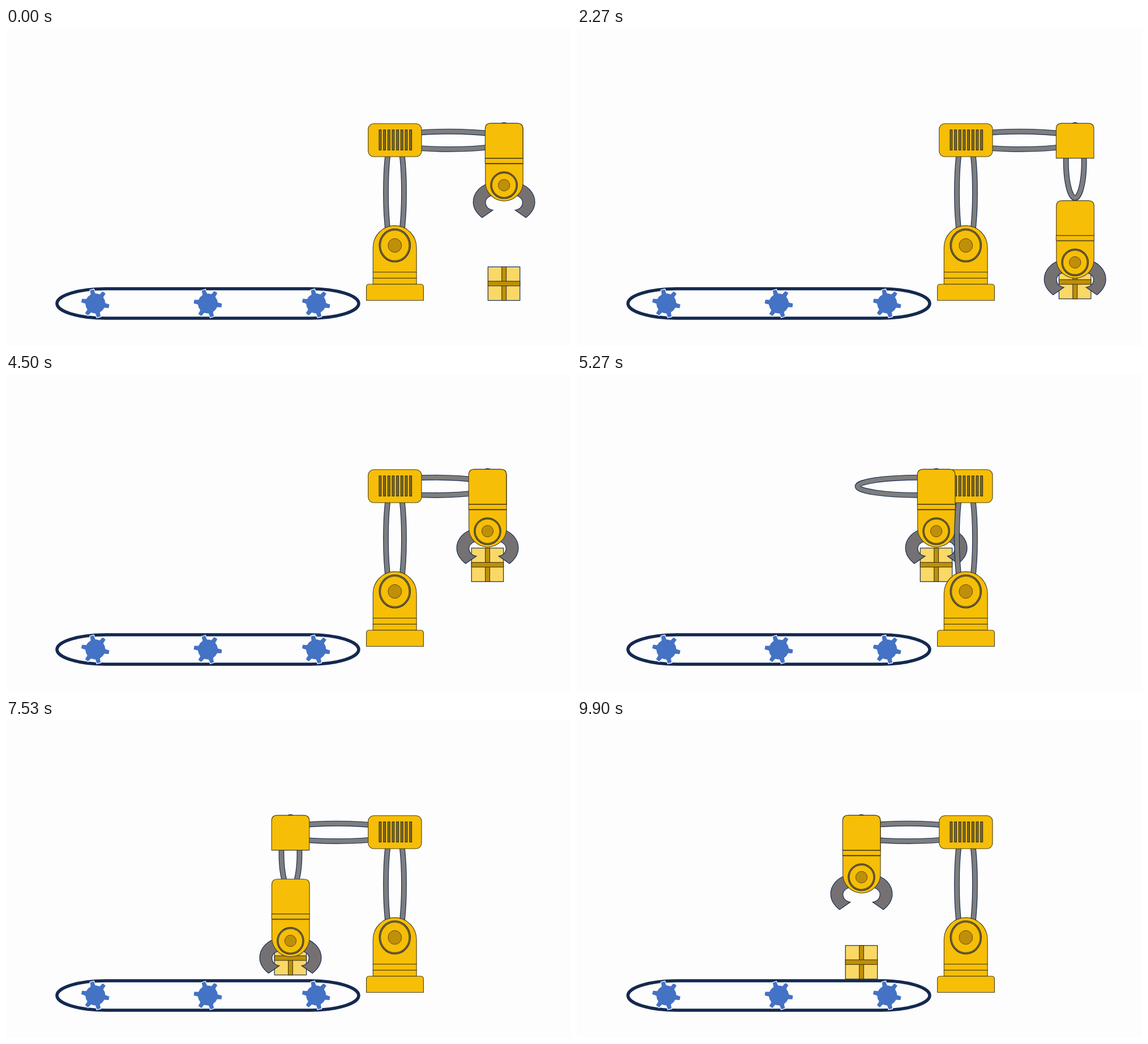
Animation of 998 by 561 pixels, one loop 9.93 s. Source, as an HTML page:

```html
<!DOCTYPE html>
<html lang="en">
<head>
<meta charset="utf-8">
<title>Robot arm</title>
<style>
  html, body { margin: 0; width: 100%; height: 100%; overflow: hidden; background: #fdfdfe; }
  svg { display: block; width: 100vw; height: 100vh; }
  .body { fill: #f6be06; stroke: #4a401c; stroke-width: 1.1; }
  .core { fill: #bf8f0a; stroke: #5f4c14; stroke-width: 1; }
  .rim { fill: #8a7840; stroke: #2c2f35; stroke-width: 1.3; }
  .slot { fill: #7d6c30; stroke: #33301f; stroke-width: 1.1; }
  .grip { fill: #757172; stroke: #172c51; stroke-width: 1.2; }
  .edge { fill: none; stroke: #172c51; stroke-width: 9.8; }
  .tube { fill: none; stroke: #7e7e7e; stroke-width: 7.5; }
  .card { fill: #fad866; stroke: #172c51; stroke-width: 1.2; }
  .ribbon { fill: #bf9006; stroke: #3d3518; stroke-width: 1.1; }
  .belt { fill: none; stroke: #14294f; stroke-width: 5.6; }
  .gear { fill: #4472c4; stroke: #fff; stroke-width: 1.2; }
</style>
</head>
<body>
<svg viewBox="0 0 998 561" preserveAspectRatio="none">
  <defs>
    <path id="grip" class="grip" d="M860 272C838 276 825 291 825.3 308C825.6 318 831.5 327 841 334.5L860 321.3C851 319.5 847 314 847 307.5C847 301 852 297 862 294Z"/>
  </defs>

  <path class="belt" d="M176 460H537A86 26 0 0 1 537 512H176A86 26 0 0 1 176 460Z"/>
  <g id="gears"></g>

  <g id="drop">
    <ellipse class="edge" cx="879.7" cy="235.5" rx="16" ry="64.3"/>
    <ellipse class="tube" cx="879.7" cy="235.5" rx="16" ry="64.3"/>
  </g>
  <g id="reach">
    <ellipse class="edge" cx="783" cy="198.2" rx="109.5" ry="15.6"/>
    <ellipse class="tube" cx="783" cy="198.2" rx="109.5" ry="15.6"/>
  </g>

  <g id="box">
    <rect class="card" x="851.4" y="421.4" width="56.4" height="59.2"/>
    <rect class="ribbon" x="875.8" y="421.4" width="7.8" height="59.2"/>
    <rect class="ribbon" x="851.4" y="446.7" width="56.4" height="8.2"/>
  </g>

  <g id="claw">
    <use href="#grip"/>
    <use href="#grip" transform="matrix(-1 0 0 1 1759.4 0)"/>
    <path class="body" d="M846.7 230V178Q846.7 168.4 856.7 168.4H903.3Q913.3 168.4 913.3 178V230Z"/>
    <rect class="body" x="846.4" y="230" width="67" height="8.8"/>
    <path class="body" d="M846.8 239.6H913.2V272A33.2 33.2 0 0 1 846.8 272Z"/>
    <circle class="rim" cx="879.7" cy="277.3" r="23.6"/>
    <circle class="body" cx="879.7" cy="277.3" r="21.4"/>
    <circle class="core" cx="879.7" cy="277.3" r="10.2"/>
  </g>

  <ellipse class="edge" cx="687" cy="290" rx="16" ry="107"/>
  <ellipse class="tube" cx="687" cy="290" rx="16" ry="107"/>

  <path class="body" d="M648.3 430.6V387.4A38.4 38.8 0 0 1 725.1 387.4V430.6Z"/>
  <rect class="body" x="648.3" y="430.6" width="76.8" height="10.8"/>
  <rect class="body" x="648.3" y="441.4" width="76.8" height="10.6"/>
  <path class="body" d="M636.6 480.5V457Q636.6 452 641.6 452H732.4Q737.4 452 737.4 457V480.5Z"/>
  <ellipse class="rim" cx="686.8" cy="383.6" rx="27.6" ry="29.2"/>
  <ellipse class="body" cx="686.8" cy="383.6" rx="25.2" ry="26.8"/>
  <ellipse class="core" cx="686.8" cy="383.6" rx="11.9" ry="12.2"/>

  <rect class="body" x="639.8" y="168.7" width="94.2" height="58.3" rx="9.8"/>
  <g id="slots"></g>

  <path id="head" class="body" d="M846.4 229.6V178Q846.4 168.1 856.4 168.1H903Q913 168.1 913 178V229.6Z"/>
</svg>

<script>
  const $ = id => document.getElementById(id);
  const LOOP = 9930;

  function add(parent, tag, attrs) {
    const el = document.createElementNS('http://www.w3.org/2000/svg', tag);
    for (const k in attrs) el.setAttribute(k, attrs[k]);
    parent.append(el);
  }

  for (let i = 0; i < 8; i++) {
    add($('slots'), 'rect', { class: 'slot', x: 659 + i * 7.68, y: 179.7, width: 3.8, height: 35.6 });
  }

  // Six teeth around a disc; each tooth narrows towards its tip.
  function gearPath() {
    const at = (r, deg) => {
      const a = deg * Math.PI / 180;
      return (r * Math.cos(a)).toFixed(2) + ' ' + (r * Math.sin(a)).toFixed(2);
    };
    const teeth = [-104, -51, 12, 76, 129, 192];
    return teeth.map((a, i) =>
      (i ? 'A18.2 18.2 0 0 1 ' : 'M') + at(18.2, a - 15) +
      'L' + at(25.6, a - 8.5) + 'L' + at(25.6, a + 8.5) + 'L' + at(18.2, a + 15)
    ).join('') + 'A18.2 18.2 0 0 1 ' + at(18.2, teeth[0] - 15) + 'Z';
  }
  for (const [x, y, turn] of [[157.8, 485.8, 0], [356.5, 486, -4], [547.8, 485.8, 0]]) {
    add($('gears'), 'path', { class: 'gear', d: gearPath(), transform: `translate(${x} ${y}) rotate(${turn})` });
  }

  // Steps: [start ms, duration ms, end value]
  const clawY = [[20, 2000, 139.6], [2050, 2000, 0], [6130, 1750, 122], [7910, 1980, 0]];
  const boxY = [[2050, 2000, -114.3], [6130, 1750, -23.6]];
  const sideX = [[4108, 2000, -377.2]];
  const reachX = [[4108, 1500, -198]];

  const ease = p => p < 0.5 ? 2 * p * p : 1 - 2 * (1 - p) ** 2;

  function track(steps, t) {
    let v = 0;
    for (const [start, dur, end] of steps) {
      const p = Math.min(1, Math.max(0, (t - start) / dur));
      v += (end - v) * ease(p);
    }
    return v;
  }

  const move = (id, x, y) => $(id).setAttribute('transform', `translate(${x.toFixed(2)} ${y.toFixed(2)})`);

  function draw(t) {
    const x = track(sideX, t);
    move('head', x, 0);
    move('drop', x, 0);
    move('claw', x, track(clawY, t));
    move('box', x, track(boxY, t));
    move('reach', track(reachX, t), 0);
  }

  const begin = performance.now();
  function tick() {
    draw((performance.now() - begin) % LOOP);
    requestAnimationFrame(tick);
  }
  draw(0);
  requestAnimationFrame(tick);
</script>
</body>
</html>
```
